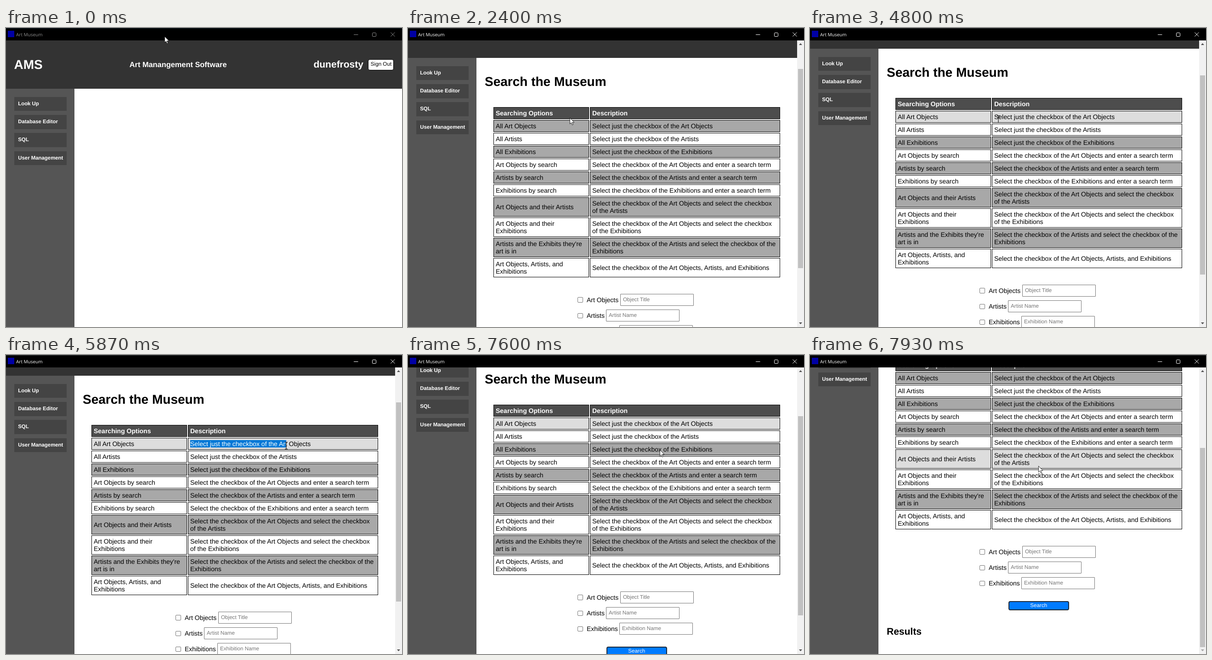
An HTML page for the animation above (8000 ms loop, 862 px wide and 650 px high).

```html
<!DOCTYPE html>
<html lang="en">
<head>
<meta charset="utf-8">
<title>Art Museum</title>
<style>
  * { box-sizing: border-box; }
  html, body { margin: 0; width: 100%; height: 100%; overflow: hidden; background: #fff; }
  body { position: relative; font: 14px/16px "Liberation Sans", Arial, sans-serif; color: #000; text-rendering: geometricPrecision; }
  body > *, main > * { position: absolute; }

  #bar { z-index: 2; left: 0; top: 0; width: 862px; height: 27px; background: #000; border-top: 1px solid #3a3f42; color: #fff; }
  #bar span { position: absolute; left: 22px; top: 5px; font: 10px/16px "Open Sans", sans-serif; }
  #bar i { position: absolute; left: 4px; top: 5px; width: 14px; height: 14px; background: #0000a4; }
  #bar svg { position: absolute; left: 750px; top: -1px; fill: none; stroke: currentColor; }
  .idle #bar { color: #8c8c8c; border-color: #14242c; }

  #page { left: 0; top: 0; width: 847px; height: 880px; }
  .blank #page { width: 862px; }
  .blank main, .blank #scroll { display: none; }
  header { position: absolute; top: 27px; width: 100%; height: 105px; padding: 0 17.5px; background: #333; color: #fff;
    display: flex; align-items: center; justify-content: space-between; font-weight: bold; font-size: 28px; }
  header b { font-size: 16.38px; }
  header div { display: flex; align-items: center; gap: 10.5px; font-size: 21px; }
  .btn { font: 11.67px/20px "Liberation Sans", Arial, sans-serif; border: 2px solid #000; border-radius: 4px; text-align: center; }
  header .btn { width: 56px; height: 24px; background: #fff; color: #000; border-width: 1.75px; }
  nav { position: absolute; top: 132px; width: 149px; bottom: 0; padding: 17.7px 17.5px; background: #555; }
  nav div { height: 30.6px; margin-bottom: 8.8px; padding-left: 8.75px; background: #444; color: #fff; font: bold 11.4px/30.6px "Liberation Sans", Arial, sans-serif; white-space: nowrap; }
  main { position: absolute; inset: 0; }
  h1, h2 { margin: 0; left: 167px; white-space: nowrap; }
  h1 { top: 168px; font-size: 28px; line-height: 32px; }
  h2 { top: 820px; font-size: 21px; line-height: 24px; }

  #table { left: 186px; top: 239px; display: grid; gap: 2px; }
  .row { display: grid; grid-template-columns: 208px 414px; gap: 2px; height: 26px; }
  .row.tall { height: 42px; }
  .row > div { display: flex; align-items: center; border: 1px solid #000; padding-left: 4px; }
  .row:nth-child(even) > div { background: #a8a8a8; }
  .row.head > div { background: #4d4d4d; color: #fff; font-weight: bold; }
  .row.hover > div { background: #ddd; }
  .row span { position: relative; white-space: pre; }
  .sel { position: absolute; left: 0; top: 0; background: #0078d7; color: #fff; }

  .check { left: 369px; width: 11.5px; height: 11.5px; border: 1px solid #767676; border-radius: 2px; }
  .label { left: 389px; white-space: nowrap; }
  .input { width: 160px; height: 25.5px; border: 1px solid #767676; border-radius: 1px; padding-left: 5px; color: #757575; font-size: 11.67px; line-height: 23.5px; }
  #search { left: 432px; top: 765px; width: 131.5px; height: 20px; background: #007bff; border-color: #1b2a3a; color: #fff; line-height: 16px; }

  #scroll { left: 847px; top: 27px; width: 15px; height: 623px; background: #f1f1f1; }
  #thumb { position: absolute; left: 2px; top: 15px; width: 11px; height: 433px; background: #c1c1c1; }
  #scroll svg { position: absolute; left: 0; top: 0; }
  #cursor { z-index: 3; left: 0; top: 0; overflow: visible; }
</style>
</head>
<body class="idle blank">
<div id="page">
  <header>AMS <b>Art Manangement Software</b><div>dunefrosty<span class="btn">Sign Out</span></div></header>
  <nav><div>Look Up</div><div>Database Editor</div><div>SQL</div><div>User Management</div></nav>
  <main>
    <h1>Search the Museum</h1>
    <div id="table"></div>
    <div id="search" class="btn">Search</div>
    <h2>Results</h2>
  </main>
</div>
<div id="scroll">
  <div id="thumb"></div>
  <svg width="15" height="623"><path id="up" d="M4 10h7l-3.5-4z"/><path id="down" d="M4 613h7l-3.5 4z"/></svg>
</div>
<div id="bar">
  <i></i><span>Art Museum</span>
  <svg width="112" height="27"><path d="M7 14.5h9.5M87.3 9.5l9 9m0-9l-9 9"/><rect x="47.5" y="10.5" width="8" height="8" rx="1.2"/></svg>
</div>
<svg id="cursor" width="1" height="1">
  <path id="a" fill="#fff" stroke="#000" stroke-width=".8" d="M.4.4V13.6L3.4 10.8 5.5 15.8 7.6 14.9 5.5 10H9.8Z"/>
  <path id="i" fill="none" stroke="#000" d="M-3-7.5h2q1 0 1 1q0-1 1-1h2M0-6.5v13M-3 7.5h2q1 0 1-1q0 1 1 1h2"/>
  <path id="h" fill="#fff" stroke="#000" stroke-width=".8" d="M-1.6 11V.8Q-1.5-.6 0-.6T1.6.8V6Q3 4.8 4 6.3Q5.4 5.6 6 7Q8 6.4 8 9V13Q8 15 6.6 16.5V19H-.6V17Q-2 15.6-3 13.6Q-6 9.8-4.4 9.4Q-3.2 9-1.6 11Z"/>
</svg>
<script>
const $ = id => document.getElementById(id);
const LOOP = 8000, TICK = 1000 / 15, MAX_SCROLL = 230;

const add = (parent, cls, text = '') => {
  const el = document.createElement('div');
  el.className = cls;
  el.textContent = text;
  return parent.appendChild(el);
};

const just = 'Select just the checkbox of the ';
const pick = 'Select the checkbox of the ';
const term = ' and enter a search term';
const both = ' and select the checkbox';
const rows = [
  ['Searching Options', 'Description'],
  ['All Art Objects', just + 'Art Objects'],
  ['All Artists', just + 'Artists'],
  ['All Exhibitions', just + 'Exhibitions'],
  ['Art Objects by search', pick + 'Art Objects' + term],
  ['Artists by search', pick + 'Artists' + term],
  ['Exhibitions by search', pick + 'Exhibitions' + term],
  ['Art Objects and their Artists', pick + 'Art Objects' + both + '\nof the Artists'],
  ['Art Objects and their\nExhibitions', pick + 'Art Objects' + both + '\nof the Exhibitions'],
  ["Artists and the Exhibits they're\nart is in", pick + 'Artists' + both + ' of the\nExhibitions'],
  ['Art Objects, Artists, and\nExhibitions', pick + 'Art Objects, Artists, and Exhibitions']
].map((cells, n) => {
  const row = add($('table'), 'row' + (n ? n > 6 ? ' tall' : '' : ' head'));
  for (const text of cells) add(row, '').appendChild(document.createElement('span')).textContent = text;
  return row;
});

// White-on-blue copies of the two selectable texts
const [selName, selText] = [...rows[1].querySelectorAll('span')].map(s => add(s, 'sel', s.textContent));

const main = document.querySelector('main');
[['Art Objects', 'Object Title', 462], ['Artists', 'Artist Name', 431], ['Exhibitions', 'Exhibition Name', 460]]
  .forEach(([label, hint, x], n) => {
    const y = 645 + n * 34.2;
    add(main, 'check').style.top = y + 7.3 + 'px';
    add(main, 'label', label).style.top = y + 4.5 + 'px';
    Object.assign(add(main, 'input', hint).style, { left: x + 'px', top: y + 'px' });
  });

// tick, x, y, pointer shape from here on
const path = [
  [0, 345, 18, 'a'], [6, 345, 18, 'a'], [7, 335, 24, 'a'], [9, 250, 80, 'a'], [11, 150, 148, 'a'],
  [13, 98, 176, 'h'], [14, 93, 177, 'h'], [25, 93, 177, 'h'], [26, 102, 175, 'h'], [27, 110, 178, 'h'],
  [28, 150, 188, 'a'], [30, 260, 196, 'a'], [33, 345, 196, 'a'], [36, 352, 195, 'a'], [38, 353, 197, 'a'],
  [39, 345, 199, 'a'], [43, 290, 199, 'a'], [44, 277, 194, 'i'], [47, 245, 188, 'i'], [50, 237, 197, 'i'],
  [60, 237, 197, 'i'], [61, 350, 203, 'a'], [62, 477, 198, 'i'], [69, 477, 198, 'i'], [70, 462, 202, 'i'],
  [72, 410, 198, 'i'], [78, 403, 196, 'i'], [81, 403, 196, 'i'], [84, 450, 195, 'i'], [88, 610, 197, 'i'],
  [91, 678, 200, 'a'], [94, 678, 200, 'a'], [97, 665, 193, 'a'], [102, 665, 193, 'a'], [103, 632, 193, 'i'],
  [106, 580, 204, 'a'], [109, 548, 206, 'a'], [115, 548, 206, 'a'], [119, 497, 241, 'a']
];
const scrolls = [[0, 0], [35, 19], [36, 67], [37, 87], [113, 93], [114, 131], [115, 169], [116, 181], [117, 202], [118, 223], [119, MAX_SCROLL]];

const last = (list, k) => list.findLastIndex(e => e[0] <= k);

function pointer(k) {
  const n = last(path, k), p = path[n], q = path[n + 1] || p;
  const f = q === p ? 0 : (k - p[0]) / (q[0] - p[0]);
  return { x: Math.round(p[1] + (q[1] - p[1]) * f), y: Math.round(p[2] + (q[2] - p[2]) * f), kind: p[3] };
}

function draw(k) {
  const { x, y, kind } = pointer(k);
  const top = scrolls[last(scrolls, k)][1];
  const within = (from, to) => k >= from && k < to;

  document.body.className = (k < 19 ? 'idle ' : '') + (k < 20 ? 'blank' : '');
  $('page').style.transform = `translateY(${-top}px)`;
  $('thumb').style.transform = `translateY(${Math.round(top * 160 / MAX_SCROLL)}px)`;
  $('up').style.fill = top ? '#505050' : '#a3a3a3';
  $('down').style.fill = top < MAX_SCROLL ? '#505050' : '#a3a3a3';

  rows[1].classList.toggle('hover', within(38, 118));
  rows[7].classList.toggle('hover', k >= 118);
  selName.style.display = within(53, 68) ? '' : 'none';
  selName.style.clipPath = `inset(0 0 0 ${k < 55 ? 41 : 0}px)`;
  selText.style.display = within(82, 100) ? '' : 'none';
  selText.style.clipPath = `inset(0 calc(100% - ${Math.min(264, x - 401)}px) 0 0)`;

  $('cursor').style.transform = `translate(${x}px, ${y}px)`;
  for (const s of 'aih') $(s).style.display = s === kind ? '' : 'none';
}

const start = performance.now();
let shown = -1;
function frame() {
  const t = (performance.now() - start) % LOOP;
  const k = Math.min(119, Math.floor((t + 5) / TICK));
  if (k !== shown) draw(shown = k);
  requestAnimationFrame(frame);
}
frame();
</script>
</body>
</html>
```
